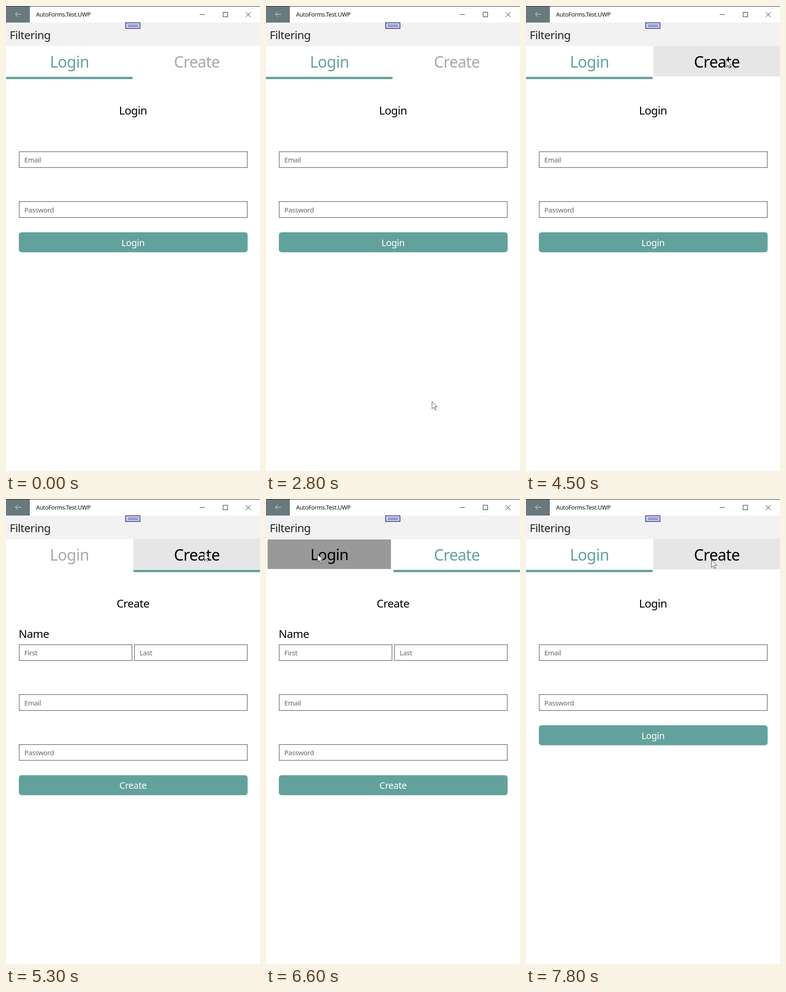
An HTML page that plays this animation: 554x1011 px, repeating every 8 s.

```html
<!DOCTYPE html>
<html lang="en">
<head>
<meta charset="utf-8">
<title>Login form</title>
<style>
html, body { margin: 0; width: 100%; height: 100%; overflow: hidden; background: #fff; }
svg { display: block; width: 100%; height: 100%; }
text { font-family: "Noto Sans", "Open Sans", sans-serif; letter-spacing: -.023em; }
.mid { text-anchor: middle; }
.line { fill: none; stroke: #222; }
</style>
</head>
<body>
<svg id="stage" viewBox="0 0 554 1011" xmlns="http://www.w3.org/2000/svg"></svg>
<script>
const TEAL = '#63a29c', LOOP = 8000, STEP = 100;

const rect = (x, y, w, h, fill, more = '') =>
  `<rect x="${x}" y="${y}" width="${w}" height="${h}" fill="${fill}" ${more}/>`;
const label = (x, y, size, str, fill = '#000', more = '') =>
  `<text x="${x}" y="${y}" font-size="${size}" fill="${fill}" ${more}>${str}</text>`;
const centred = (x, y, size, str, fill) => label(x, y, size, str, fill, 'class="mid"');
const field = (x, y, w, hint) =>
  rect(x + .75, y + .75, w - 1.5, 34.5, '#fff', 'stroke="#7a7a7a" stroke-width="1.5"') +
  label(x + 12, y + 24, 14.9, hint, '#666');
const button = (y, str) =>
  rect(28, y, 499, 43.5, TEAL, 'rx="6"') + centred(277, y + 29.5, 20.2, str, '#fff');

const frame =
  rect(0, 0, 554, 1, '#222') +
  rect(0, 1, 52, 35, '#69797e') +
  '<path d="M33 18H20.5M26 12.5L20.5 18L26 23.5" class="line" style="stroke:#e8ecec"/>' +
  label(65.5, 23, 12.7, 'AutoForms.Test.UWP', '#111') +
  '<path d="M422.5 18.5H433.5M473.5 13.5H483.5V23.5H473.5ZM523 13.5L533.5 24M533.5 13.5L523 24" class="line"/>' +
  rect(0, 36, 554, 51, '#f2f2f2') +
  label(8, 72, 24.4, 'Filtering', '#222', 'font-weight="300"') +
  rect(260.9, 36.4, 31.4, 12.4, '#c9cef0', 'stroke="#3b3f7f" stroke-width="1.6"') +
  '<path d="M266 41.5H288M266 44.5H288" class="line" style="stroke:#3b3f7f"/>';

const tab = (id, x, str) =>
  `<g id="${id}">${rect(x, 87, 276, 66, 'none')}${centred(x + 138.3, 133.5, 34, str)}</g>` +
  rect(x, 154, 276, 5, TEAL, `id="${id}Bar"`);

const loginPage = centred(277, 236, 24.4, 'Login') +
  field(28, 316, 499, 'Email') + field(28, 424.5, 499, 'Password') + button(492, 'Login');

const createPage = centred(277, 236, 24.4, 'Create') + label(27.5, 302, 24.4, 'Name') +
  field(28, 316, 247.5, 'First') + field(279.5, 316, 247.5, 'Last') +
  field(28, 424.5, 499, 'Email') + field(28, 533, 499, 'Password') + button(600.5, 'Create');

document.getElementById('stage').innerHTML = rect(0, 0, 554, 1011, '#fff') + frame +
  tab('login', 0, 'Login') + tab('create', 278, 'Create') +
  `<g id="loginPage">${loginPage}</g><g id="createPage">${createPage}</g>` +
  '<path id="cursor" d="M.5 .5V16.6L4.2 13.1L6.9 19.2L9.5 18.1L6.9 12.2H12Z" fill="#fff" stroke="#333" stroke-width=".9"/>';

const el = id => document.getElementById(id);
const show = (id, on) => el(id).setAttribute('visibility', on ? 'visible' : 'hidden');

// Pointer paths: start, end, from, to, easing
const inOut = p => p * p * (3 - 2 * p), out = p => 1 - (1 - p) ** 2, linear = p => p;
const moves = [
  [2000, 2100, [285, 4], [316, 35], linear],
  [2400, 2900, [280, 747], [365, 864], out],
  [3900, 4500, [304, 290], [436, 116], inOut],
  [5200, 5800, [436, 116], [288, 130], p => p * p],
  [5800, 6200, [288, 130], [112, 120], out],
  [6700, 7600, [112, 120], [404, 131], inOut],
  [7700, 7800, [404, 131], [404, 132], linear]
];
const within = (t, a, b) => t >= a && t < b;

function pointer(t) {
  if (!within(t, 2000, 2200) && !within(t, 2400, 3000) && t < 3900) return null;
  const [a, b, from, to, ease] = moves.filter(m => m[0] <= t).pop();
  const p = ease(Math.min(1, (t - a) / (b - a)));
  return from.map((v, i) => v + (to[i] - v) * p);
}

function drawTab(id, x, selected, hover, pressed) {
  const g = el(id), cx = x + 138, over = hover || pressed;
  g.children[0].setAttribute('fill', pressed ? '#999' : hover ? '#e6e6e6' : 'none');
  g.children[1].setAttribute('fill', over ? '#000' : selected ? TEAL : '#a9a9a9');
  g.setAttribute('transform',
    pressed ? `translate(${cx} 120) scale(.975) translate(${-cx} -120)` : '');
  show(id + 'Bar', selected);
}

function draw(t) {
  const pos = pointer(t), creating = within(t, 5300, 6800);
  const over = x => !!pos && pos[1] >= 87 && pos[1] < 153 && pos[0] >= x && pos[0] < x + 277;
  drawTab('login', 0, !creating, over(0), within(t, 6600, 6800));
  drawTab('create', 278, creating, over(278), within(t, 5100, 5300));
  show('loginPage', !creating);
  show('createPage', creating);
  show('cursor', !!pos);
  if (pos) el('cursor').setAttribute('transform', `translate(${pos})`);
}

const start = performance.now();
function tick(now) {
  const t = Math.max(0, now - start) % LOOP;
  draw(Math.floor(t / STEP) * STEP);
  requestAnimationFrame(tick);
}
draw(0);
requestAnimationFrame(tick);
</script>
</body>
</html>
```
